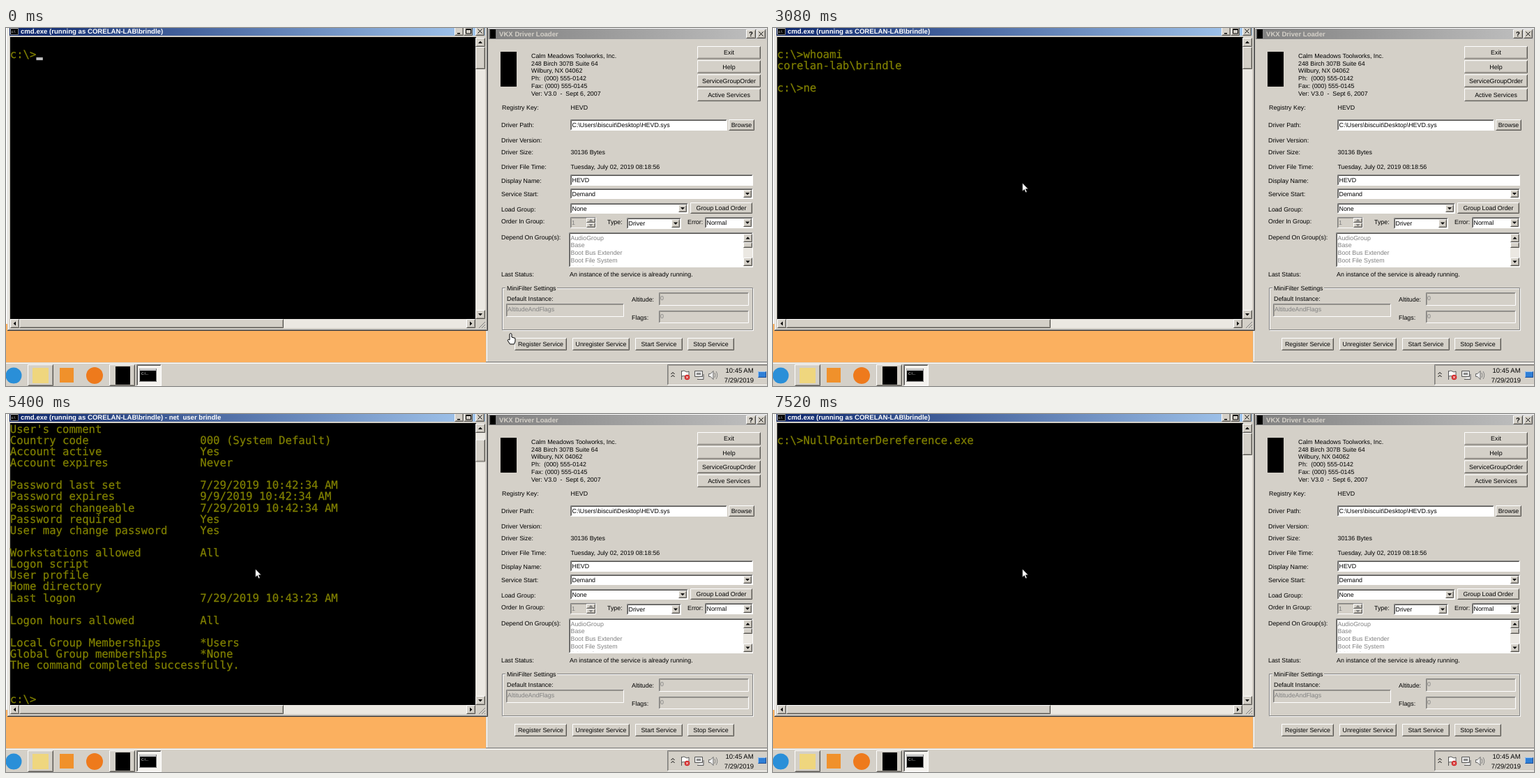
An HTML page that plays this animation: 1091x513 px, repeating every 8 s.

```html
<!DOCTYPE html>
<html lang="en">
<head>
<meta charset="utf-8">
<title>Console session</title>
<style>
  html, body { margin: 0; width: 100%; height: 100%; overflow: hidden; }
  svg { display: block; width: 100%; height: 100%; }
  text { white-space: pre; font: 8.9px "Liberation Sans", Arial, sans-serif; text-rendering: geometricPrecision; }
  .title { font-weight: bold; font-size: 9.6px; }
  .clock { font-size: 9.5px; }
  .mono { font: 15.61px "DejaVu Sans Mono", monospace; stroke: #808000; stroke-width: .25; }
</style>
</head>
<body>
<svg id="stage" viewBox="0 0 1091 513"></svg>
<script>
const FACE = '#d4d0c8', GREY = '#808080', DARK = '#404040', EDGE = '#585652';
const LOOP = 8000, COL = 9.4, ROW = 16.13, LEFT = 5.8, BASE = 26.6;
const USER = 'brindle';
const TITLE = `cmd.exe (running as CORELAN-LAB\\${USER})`;

// ---- drawing helpers, each returns markup ----
const rect = (x, y, w, h, fill, more = '') =>
  `<rect x="${x}" y="${y}" width="${w}" height="${h}" fill="${fill}" ${more}/>`;
const circle = (x, y, r, fill) => `<circle cx="${x}" cy="${y}" r="${r}" fill="${fill}"/>`;
const path = (d, more) => `<path d="${d}" ${more}/>`;
const line = (d, color) => path(d, `fill="none" stroke="${color}"`);
const text = (x, y, s, fill = '#000', more = '') =>
  `<text x="${x}" y="${y}" fill="${fill}" ${more}>${s}</text>`;
const mid = 'text-anchor="middle"';

function bevel(x, y, w, h, fill, light, shade) {
  const l = x + .5, t = y + .5, r = x + w - .5, b = y + h - .5;
  return rect(x, y, w, h, fill) +
    line(`M${l} ${b}V${t}H${r}`, light) + line(`M${l} ${b}H${r}V${t}`, shade);
}
const raised = (x, y, w, h) =>
  bevel(x, y, w, h, FACE, '#fff', EDGE) +
  line(`M${x + 1.5} ${y + h - 1.5}H${x + w - 1.5}V${y + 1.5}`, '#a09c94');
const sunken = (x, y, w, h, fill = '#fff') =>
  bevel(x, y, w, h, fill, GREY, '#fff') +
  line(`M${x + 1.5} ${y + h - 1.5}V${y + 1.5}H${x + w - 1.5}`, fill === FACE ? '#a09c94' : EDGE);
const button = (x, y, w, h, label) =>
  raised(x, y, w, h) + text(x + w / 2, y + h / 2 + 3.1, label, '#000', mid);
const field = (x, y, w, h, s) => sunken(x, y, w, h) + text(x + 2.5, y + h / 2 + 3, s);
const disabled = (x, y, w, h, s) => sunken(x, y, w, h, FACE) + text(x + 2, y + 11.4, s, GREY);

function arrow(x, y, turn = 0, fill = '#000') {
  return path('M-3 -1.5H3L0 1.8Z', `fill="${fill}" transform="translate(${x} ${y}) rotate(${turn})"`);
}
const arrowButton = (x, y, w, h, turn) => raised(x, y, w, h) + arrow(x + w / 2, y + h / 2, turn);
const select = (x, y, w, h, s) =>
  field(x, y, w, h, s) + arrowButton(x + w - 14, y + 2, 12, h - 4);

function desktop() {
  return rect(0, 0, 1091, 513, '#fbb05f') + rect(0, 0, 2, 424, '#fff');
}

function consoleWindow() {
  return rect(2, 0, 688, 433, FACE) +
    line('M3.5 432V0', '#fff') + line('M2 433.5H690.5V0', DARK) + line('M3 432.5H689.5V0', GREY) +
    rect(5, 0, 682, 11, 'url(#active)') +
    bevel(6, 0, 12, 10, '#000', '#c0c0c0', GREY) +
    text(8, 7, 'c:\\', '#fff', 'style="font-size:5px"') +
    [643, 656, 673].map(x => raised(x, -2, 13, 13)).join('') +
    rect(647, 7, 4, 1.5, '#000') +
    path('M659.5 1.5H666.5V8H659.5ZM659.5 2.5H666.5', 'fill="none" stroke="#000"') +
    line('M676.5 1.5L682.5 7.5M682.5 1.5L676.5 7.5', '#000') +
    rect(6, 13, 668, 404, '#000') +
    rect(673, 14, 14, 403, '#ebe8e2') + rect(6, 417, 667, 13, '#ebe8e2') +
    arrowButton(673, 14, 14, 13, 180) + arrowButton(673, 404, 14, 13) +
    `<g id="thumb">${raised(673, 27, 14, 32)}</g>` +
    arrowButton(6, 417, 13, 13, 90) + arrowButton(660, 417, 13, 13, -90) +
    raised(19, 417, 379, 13) + rect(673, 417, 14, 13, FACE) +
    line('M678 430L687 421M682 430L687 425M686 430L687 429', GREY) +
    text(21, 8, TITLE, '#fff', 'class="title" id="caption"') + '<g id="screen"></g>' +
    rect(0, 0, COL, 4, '#c0c0c0', 'id="caret"');
}

function loaderWindow() {
  const labels = [
    [711, 117, 'Registry Key:'], [809.5, 117, 'HEVD'], [710, 142, 'Driver Path:'],
    [710, 163.5, 'Driver Version:'], [710, 181, 'Driver Size:'], [809.5, 181, '30136 Bytes'],
    [710, 201.5, 'Driver File Time:'], [809.5, 201.5, 'Tuesday, July 02, 2019 08:18:56'],
    [710, 221.5, 'Display Name:'], [710, 240.5, 'Service Start:'], [710, 263, 'Load Group:'],
    [710, 279.5, 'Order In Group:'], [862, 281, 'Type:'], [977, 281, 'Error:'],
    [710, 302.5, 'Depend On Group(s):'], [710, 356, 'Last Status:'],
    [808, 356, 'An instance of the service is already running.'],
    [718, 390.5, 'Default Instance:'], [897, 392, 'Altitude:'], [897, 418, 'Flags:']
  ];
  const address = ['Calm Meadows Toolworks, Inc.', '248 Birch 307B Suite 64',
    'Wilbury, NX 04062', 'Ph:  (000) 555-0142', 'Fax: (000) 555-0145', 'Ver: V3.0  -  Sept 6, 2007'];
  const groups = ['AudioGroup', 'Base', 'Boot Bus Extender', 'Boot File System', 'COM Infrastructure'];
  return rect(688, 0, 403, 479, FACE) +
    line('M689.5 478V.5H1091', '#fff') + line('M688 478.5H1091', GREY) +
    rect(692, 1, 398, 15, 'url(#inactive)') + rect(694, 2, 8, 13, '#000') +
    text(707, 12, 'VKX Driver Loader', FACE, 'class="title"') +
    raised(1061, 2, 14, 13) + raised(1076, 2, 13, 13) +
    text(1068, 12, '?', '#000', `class="title" ${mid}`) +
    line('M1079.5 5.5L1085.5 11.5M1085.5 5.5L1079.5 11.5', '#000') +
    rect(709, 34, 23, 50, '#000') +
    address.map((s, i) => text(753, 43 + i * 10.7, s)).join('') +
    ['Exit', 'Help', 'ServiceGroupOrder', 'Active Services']
      .map((s, i) => button(991, 26 + i * 20.2, 91, 18.5, s)).join('') +
    labels.map(l => text(...l)).join('') +
    field(809, 131, 225, 16, 'C:\\Users\\biscuit\\Desktop\\HEVD.sys') + button(1036, 131, 37, 16, 'Browse') +
    field(809, 210, 262, 16, 'HEVD') +
    select(809, 230, 262, 15, 'Demand') + select(809, 251, 169, 15, 'None') +
    button(981, 250, 89, 16, 'Group Load Order') +
    disabled(809, 271, 37, 16, '1') + raised(832, 272, 13, 7) + raised(832, 279, 13, 7) +
    arrow(838.5, 275.5, 180, GREY) + arrow(838.5, 282.5, 0, GREY) +
    select(890, 272, 78, 16, 'Driver') + select(1002, 271, 69, 16, 'Normal') +
    sunken(807, 293, 264, 50) +
    `<g clip-path="url(#list)">${groups.map((s, i) => text(809.5, 303.5 + i * 10.8, s, GREY)).join('')}</g>` +
    rect(1057, 295, 13, 47, '#ebe8e2') + arrowButton(1057, 295, 13, 12, 180) +
    raised(1057, 307, 13, 8) + arrowButton(1057, 329, 13, 12) +
    path('M711.5 372.5H1070.5V432.5H711.5Z', 'fill="none" stroke="#fff" transform="translate(1 1)"') +
    path('M711.5 372.5H1070.5V432.5H711.5Z', `fill="none" stroke="${GREY}"`) +
    rect(716, 370, 74, 6, FACE) + text(718, 375.5, 'MiniFilter Settings') +
    disabled(717, 395, 169, 19, 'AltitudeAndFlags') +
    disabled(936, 379, 129, 19, '0') + disabled(936, 405, 129, 18, '0') +
    button(729, 444, 75, 18, 'Register Service') + button(812, 444, 82, 18, 'Unregister Service') +
    button(902, 444, 68, 18, 'Start Service') + button(977, 444, 67, 18, 'Stop Service');
}

function taskbar() {
  return rect(0, 479, 1091, 34, FACE) + rect(0, 480, 1091, 1, '#fff') +
    circle(11, 498, 11.5, '#2a8fd8') +
    raised(31, 482, 37, 31) + rect(38, 487, 23, 22, '#efd67e') +
    rect(77, 487, 20, 21, '#f0912b') + circle(127, 498, 12, '#ee7a1c') +
    raised(148, 482, 37, 31) + rect(157, 485, 21, 26, '#000') +
    sunken(187, 482, 36, 31, '#f4f2ee') +
    bevel(191, 488, 25, 19, '#000', '#b8b8b8', GREY) + rect(192, 489, 23, 2, '#c8c8c8') +
    text(194, 497, 'C:\\...', '#fff', 'style="font-size:5px"') +
    sunken(948, 482, 146, 30, FACE) +
    line('M953.5 496L956 493.5L958.5 496M953.5 500L956 497.5L958.5 500', '#000') +
    path('M968.5 491V504M969 492Q972 490 974 492T979 492V499Q976 500 974 499T969 499',
      'fill="#fff" stroke="#555"') +
    circle(976.5, 500.5, 3.8, '#d32f2f') + line('M975 499L978 502M978 499L975 502', '#fff') +
    path('M987.5 491.5H998.5V499.5H987.5ZM991 503.5H1000V496', 'fill="#e8e8e8" stroke="#555"') +
    rect(990, 494, 6, 3, '#888') +
    path('M1007.5 495.5H1010L1014 491.5V503.5L1010 499.5H1007.5Z', 'fill="#eee" stroke="#666"') +
    line('M1016 494Q1018 497.5 1016 501M1018 492Q1021.5 497.5 1018 503', GREY) +
    text(1051.5, 494, '10:45 AM', '#000', `class="clock" ${mid}`) +
    text(1051, 507.5, '7/29/2019', '#000', `class="clock" ${mid}`) +
    bevel(1078, 492, 12, 9, '#2f7fd6', '#9cc4f0', '#1c4c94');
}

const defs = `<defs>
  <linearGradient id="active"><stop stop-color="#0a246a"/><stop offset="1" stop-color="#a6caf0"/></linearGradient>
  <linearGradient id="inactive"><stop stop-color="#808080"/><stop offset="1" stop-color="#c0c0c0"/></linearGradient>
  <clipPath id="list"><rect x="809" y="295" width="248" height="46"/></clipPath></defs>`;
const pointers =
  path('M0 0V12L2.8 9.4L4.7 13.8L6.6 13L4.8 8.7H8.5Z',
    'id="pointer" fill="#fff" stroke="#000" stroke-width=".6"') +
  path('M722 438.5Q723.5 436.5 725 438.5V443L730 444.5V449L728.5 453H722.5L719 447.5Q720 445.5 722 447Z',
    'id="hand" fill="#fff" stroke="#000"');

const $ = id => document.getElementById(id);
$('stage').innerHTML = defs + desktop() + loaderWindow() + consoleWindow() + taskbar() + pointers;
$('screen').innerHTML = Array.from({ length: 25 },
  (_, r) => text(LEFT, BASE + r * ROW, '', '#808000', 'class="mono"')).join('');

// ---- console contents ----
const row = (label, value) => label.padEnd(29) + value;
const home = '\nc:\\>';
const named = `${home}whoami\ncorelan-lab\\${USER}`;
const next = `${named}\n\nc:\\>`;
const report = [
  "User's comment", row('Country code', '000 (System Default)'), row('Account active', 'Yes'),
  row('Account expires', 'Never'), '',
  row('Password last set', '7/29/2019 10:42:34 AM'), row('Password expires', '9/9/2019 10:42:34 AM'),
  row('Password changeable', '7/29/2019 10:42:34 AM'), row('Password required', 'Yes'),
  row('User may change password', 'Yes'), '',
  row('Workstations allowed', 'All'), 'Logon script', 'User profile', 'Home directory',
  row('Last logon', '7/29/2019 10:43:23 AM'), '', row('Logon hours allowed', 'All'), '',
  row('Local Group Memberships', '*Users'), row('Global Group memberships', '*None'),
  'The command completed successfully.', '', '', 'c:\\>'
].join('\n');

// time, contents, caret shown, caption suffix
const steps = [];
const type = (base, keys) => keys.forEach(([t, s, caret]) => steps.push([t, base + s, caret, '']));
type(home, [[0, '', 1], [240, ''], [760, '', 1], [920, 'w'], [1080, 'wh'], [1240, 'who'],
  [1320, 'who', 1], [1440, 'whoa'], [1680, 'whoam'], [1760, 'whoami']]);
steps.push([1840, `${home}whoami\n`, 0, ' - whoami'], [1920, named, 0, ' - whoami']);
const query = `net user ${USER}`;
type(next, [[2000, ''], [2840, 'n'], [2920, 'n', 1], [3080, 'ne'], [3320, 'net'], [3480, 'net ', 1],
  ...[3560, 3720, 3840, 3920].map((t, i) => [t, query.slice(0, 5 + i)]),
  ...[4160, 4400, 4560, 4720, 4880, 5040].map((t, i) => [t, query.slice(0, 10 + i)]),
  [5080, query.slice(0, -1), 1], [5280, query]]);
steps.push([5400, report, 0, ` - net  user ${USER}`]);
type(report, [[5480, ''], [6200, '', 1], [6440, 'c'], [6560, 'cl'], [6640, 'cls']]);
type(home, [[6760, ''], [7200, 'N'], [7280, 'N', 1], [7360, 'Nu'], [7520, 'NullPointerDereference.exe']]);

const moves = [80, 160, 200, 280, 360];
const lines = [...$('screen').children];
let shown;

function showStep(step) {
  if (step === shown) return;
  shown = step;
  const [, content, caret, suffix] = step;
  const rows = content.split('\n'), last = rows.length - 1;
  lines.forEach((el, i) => el.textContent = rows[i] || '');
  $('caption').textContent = TITLE + suffix;
  $('thumb').setAttribute('transform', `translate(0 ${content.startsWith(report) ? 9.5 : 0})`);
  $('caret').setAttribute('visibility', caret ? 'visible' : 'hidden');
  $('caret').setAttribute('x', LEFT + rows[last].length * COL);
  $('caret').setAttribute('y', BASE + last * ROW - .6);
}

function movePointer(t) {
  const k = moves.filter(m => m <= t).length / moves.length;
  const rest = (1 - k) ** 2;
  $('hand').setAttribute('visibility', k ? 'hidden' : 'visible');
  $('pointer').setAttribute('visibility', k ? 'visible' : 'hidden');
  $('pointer').setAttribute('transform', `translate(${357.5 + 365 * rest} ${222 + 216 * rest})`);
}

function draw() {
  const t = performance.now() % LOOP;
  showStep(steps.filter(s => s[0] <= t).pop());
  movePointer(t);
  requestAnimationFrame(draw);
}
draw();
</script>
</body>
</html>
```
